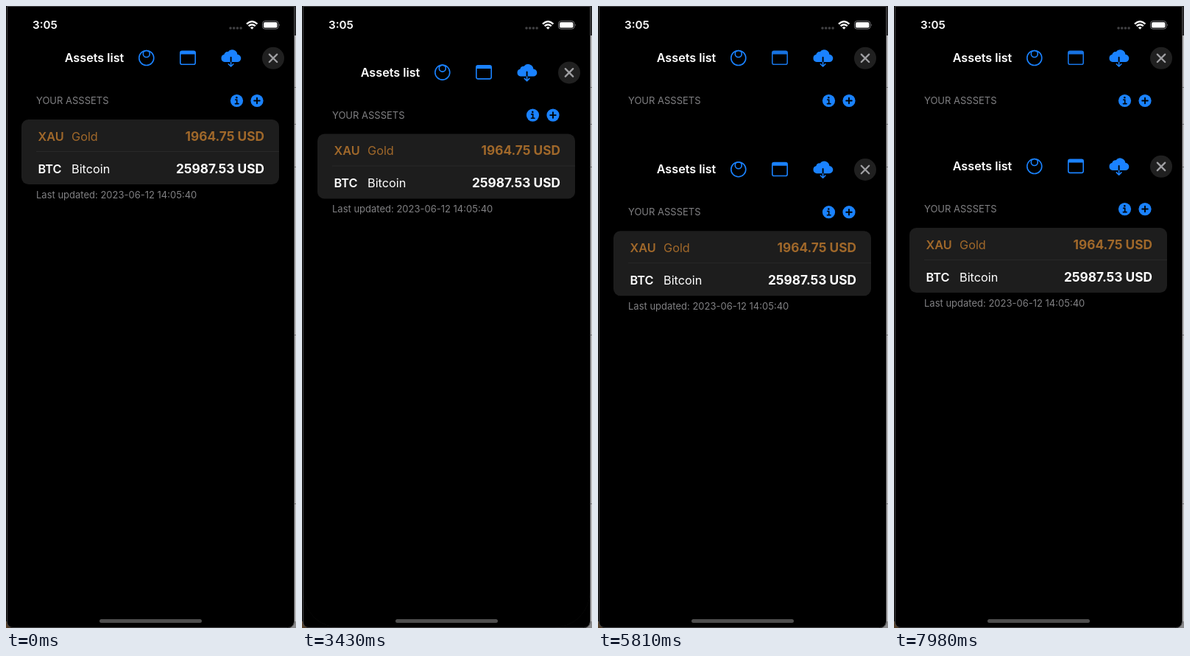
An HTML page that plays this animation: 394 by 844 pixels, repeating every 8000 ms.

```html
<!DOCTYPE html>
<html lang="en">
<head>
<meta charset="utf-8">
<title>Assets list</title>
<style>
  html, body { margin: 0; height: 100%; overflow: hidden; background: #000; }
  svg { display: block; width: 394px; height: 844px; }
  text { font-family: Inter, Roboto, sans-serif; fill: #fff; }
  .screen { --bg: #000; --card: #1d1d1d; --sep: #292929; --close: #202020; --grey: #808083; }
  .raised { --bg: #1d1d1d; --card: #2c2c2c; --sep: #383838; --close: #3b3b3d; --grey: #8e8e91; }
  .bg { fill: var(--bg); }
  .card { fill: var(--card); }
  .blue { fill: #1a82ff; }
  .line { fill: none; stroke: #1a82ff; stroke-width: 1.6; stroke-linecap: round; stroke-linejoin: round; }
  .cut { fill: none; stroke: var(--bg); stroke-width: 1.9; stroke-linecap: round; }
  .title { font-size: 16.2px; font-weight: 600; }
  .note { font-size: 13px; fill: var(--grey); }
  .row { font-size: 16.3px; }
  .row .code { font-weight: 600; }
  .row .price { font-size: 17.3px; font-weight: 700; text-anchor: end; }
  .gold text { fill: #a0682a; }
</style>
</head>
<body>
<svg viewBox="0 0 394 844">
  <defs>
    <clipPath id="device"><rect x="2" y="-60" width="389" height="903" rx="48"/></clipPath>
  </defs>
  <rect width="394" height="844"/>
  <g id="base" class="screen"></g>
  <rect id="dim" x="2" width="389" height="844" opacity="0"/>
  <g clip-path="url(#device)">
    <g id="sheet" class="screen raised"></g>
    <g id="cover" class="screen"></g>
  </g>
  <circle id="touch" r="20" fill="#fff" fill-opacity=".65" stroke="#fff" stroke-opacity=".25"/>

  <g id="status">
    <text x="36" y="31.4" font-size="15.2" font-weight="600">3:05</text>
    <g fill="#414143">
      <circle cx="305" cy="30" r="1.8"/><circle cx="309.7" cy="30" r="1.8"/>
      <circle cx="314.4" cy="30" r="1.8"/><circle cx="319.1" cy="30" r="1.8"/>
    </g>
    <g fill="none" stroke="#fff" stroke-width="2.4">
      <path d="M327 24.3q7.2-6.4 14.4 0M329.6 27.2q4.6-4 9.2 0"/>
    </g>
    <path d="M331.8 29.2q2.4-1.9 4.8 0l-2.4 2.6z" fill="#fff"/>
    <rect x="348.5" y="20.5" width="21.4" height="10.6" rx="3.2" fill="none" stroke="#77777a"/>
    <rect x="350" y="22" width="18.4" height="7.6" rx="1.9" fill="#fff"/>
    <path d="M371.2 24q1.7 1.8 0 3.7z" fill="#77777a"/>
  </g>
  <rect x="127" y="832" width="139" height="5" rx="2.5" fill="#4e4e4e"/>

  <g id="window-frame">
    <rect x="392" width="2" height="40" fill="#262628"/>
    <rect x="392" y="40" width="2" height="804" fill="#b4b4b6"/>
    <path d="M392 110.5h2m-2 50h2m-2 58h2m-2 228h2m-2 229h2" stroke="#707072"/>
    <path d="M0 835v9h10q-8 0-8.5-9z" fill="#54402b"/>
    <path d="M394 835v9h-12q8 0 9.5-9z" fill="#8a8a8c"/>
    <path d="M1.5 835V.5H391.5V835q0 8.5-9 8.5H10q-8.5 0-8.5-8.5z" fill="none" stroke="#444446"/>
  </g>
</svg>
<script>
const LOOP = 8000, STEP = 70, HEIGHT = 844, SHEET_TOP = 58, SHEET_START = 1859;
// Each tap: finger down, start of the slide, position
const taps = [
  [3010, 3120, 252, 88],
  [4130, 4310, 250.5, 76],
  [5530, 5638, 250, 67.5],
  [6580, 6756, 248, 70],
  [7700, 7806, 250, 68.5],
].map(([down, start, x, y]) => ({ down, start, up: start - 37, x, y }));

const row = (y, code, name, price, tint = '') => `
  <g class="row ${tint}">
    <text class="code" x="43.5" y="${y}">${code}</text>
    <text x="89" y="${y}">${name}</text>
    <text class="price" x="351" y="${y}">${price} USD</text>
  </g>`;

const header = `
  <text class="title" x="79.7" y="76">Assets list</text>
  <circle class="line" cx="190.8" cy="70.5" r="10"/>
  <circle class="line" cx="190.8" cy="65" r="4.5"/>
  <g class="window">
    <rect class="line" x="236.8" y="61.3" width="20.4" height="18" rx="2.3"/>
    <path class="blue" d="M237 65.5v-2.5q0-2 2-2h16q2 0 2 2v2.5z"/>
  </g>
  <path class="blue" d="M297 76a5.2 5.2 0 0 1-.6-10.2a4.3 4.3 0 0 1 5.1-3.6a7.2 7.2 0 0 1 12.9 3.6a5.1 5.1 0 0 1-.4 10.2z"/>
  <path class="cut" d="M305.6 69.8v6.500"/>
  <path class="line" d="M305.6 76.5v5.300M302.3 78.800l3.300 3.200l3.300-3.200"/>
  <circle cx="363" cy="70.8" r="15" fill="var(--close)"/>
  <path d="M357.8 65.6l10.4 10.4m0-10.4l-10.4 10.4" stroke="#a0a0a3" stroke-width="2.3" stroke-linecap="round"/>`;

const list = `
  <text class="note" x="41" y="133">YOUR ASSSETS</text>
  <circle class="blue" cx="313.5" cy="128.5" r="8.6"/>
  <circle class="bg" cx="313.3" cy="124.3" r="1.3"/>
  <path class="cut" style="stroke-width:1.6" d="M311.7 127.3h2v5.3m-2.3 0h4.6"/>
  <circle class="blue" cx="341" cy="128.5" r="8.6"/>
  <path class="cut" d="M337.2 128.5h7.6M341 124.7v7.6"/>
  <rect class="card" x="21" y="154" width="350" height="88" rx="9.5"/>
  <path d="M41 197.5H371" stroke="var(--sep)"/>
  ${row(182.5, 'XAU', 'Gold', '1964.75', 'gold')}
  ${row(226.5, 'BTC', 'Bitcoin', '25987.53')}
  <text class="note" x="41" y="260.5">Last updated: 2023-06-12 14:05:40</text>`;

const screen = (radius = 0, headerY = 0, listY = 0) => `
  <rect class="bg" x="2" width="389" height="920" rx="${radius}"/>
  <g transform="translate(0 ${headerY})">${header}</g>
  <g transform="translate(0 ${listY})">${list}</g>`;

const el = id => document.getElementById(id);
const base = el('base'), sheet = el('sheet'), cover = el('cover'), dim = el('dim'), touch = el('touch');
base.innerHTML = screen();
cover.innerHTML = screen();
sheet.innerHTML = screen(10, 16 - SHEET_TOP, 22 - SHEET_TOP);
const icons = [base, sheet].map(g => g.querySelector('.window'));

// Remaining distance of a critically damped spring, from 1 to 0
const remaining = ms => {
  const x = Math.max(0, ms) * Math.sqrt(1000 / 3) / 1000;
  return (1 + x) * Math.exp(-x);
};
const place = (node, y, visible) => {
  node.setAttribute('transform', `translate(0 ${y.toFixed(2)})`);
  node.style.display = visible ? '' : 'none';
};

function draw(t) {
  const tap = taps.findLast(p => t >= p.down);
  const coverY = tap ? HEIGHT * remaining(t - tap.start) : HEIGHT;
  const sliding = tap && t >= tap.start && coverY > 0.1;
  const sheetLeft = remaining(t - SHEET_START);
  const sheetShown = t >= SHEET_START && (!tap || tap === taps[0] && (t < tap.start || sliding));

  place(sheet, SHEET_TOP + (HEIGHT - SHEET_TOP) * sheetLeft, sheetShown);
  place(cover, coverY, sliding);
  dim.setAttribute('opacity', sheetShown ? 0.48 * (1 - sheetLeft) : 0);

  const pressed = tap && t < tap.up;
  touch.style.display = pressed ? '' : 'none';
  if (pressed) touch.setAttribute('transform', `translate(${tap.x} ${tap.y})`);
  const glow = tap ? Math.min(1, 0.3 + 0.7 * Math.max(0, t - tap.up) / 250) : 1;
  icons.forEach(icon => icon.setAttribute('opacity', glow));
}

const origin = performance.now();
function tick() {
  const t = (performance.now() - origin) % LOOP;
  draw(Math.floor(t / STEP) * STEP);
  requestAnimationFrame(tick);
}
tick();
</script>
</body>
</html>
```
